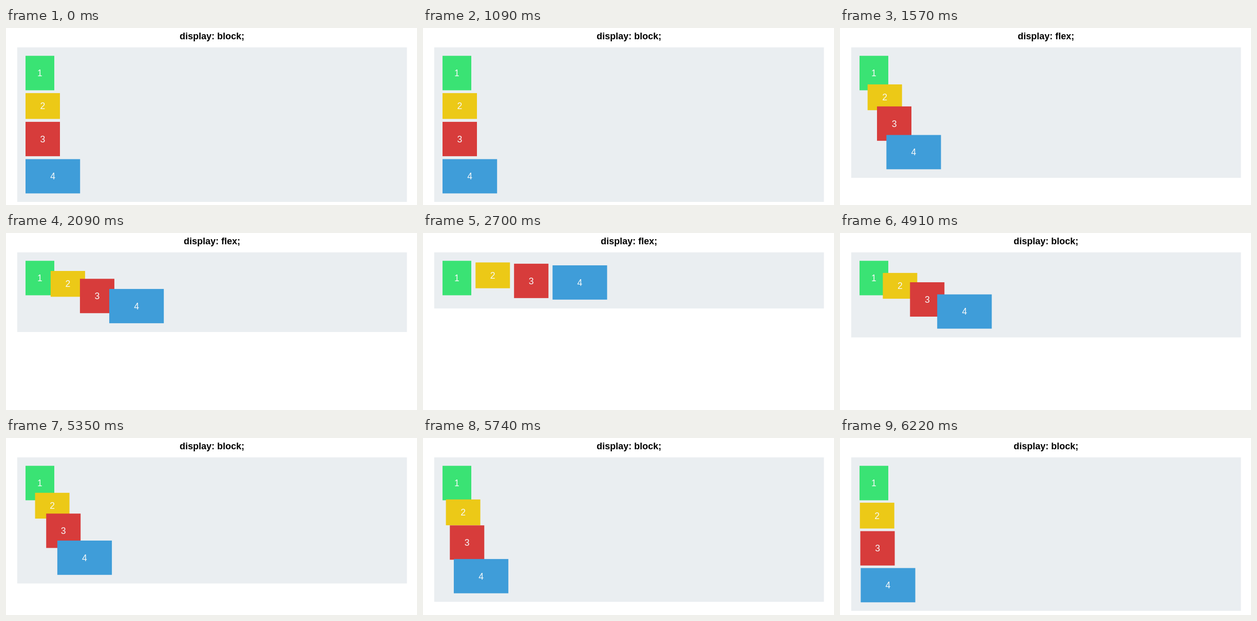
An HTML page with a canvas that plays this animation: 800x345 px, repeating every 6.27 s.

```html
<!DOCTYPE html>
<html lang="en">
<head>
<meta charset="utf-8">
<title>display: block and flex</title>
<style>
  html, body { margin: 0; width: 100%; height: 100%; overflow: hidden; background: #fff; }
  canvas { display: block; width: 800px; height: 345px; }
</style>
</head>
<body>
<canvas id="stage"></canvas>
<script>
const W = 800, H = 345;
const LOOP = 6270, FPS = 23, DURATION = 2000;
const TO_FLEX = 1220, TO_BLOCK = 4487;
const FONT = '"Liberation Sans", Arial, sans-serif';
const TOP = 54.2;

// x and y in the block layout, fx is x in the flex row
const boxes = [
  { color: '#3ae374', x: 38, y: TOP, fx: 38, w: 56, h: 67.2 },
  { color: '#ecc917', x: 38, y: 126.9, fx: 105.2, w: 67, h: 50.3 },
  { color: '#d73c3b', x: 38, y: 182.9, fx: 183.6, w: 67, h: 67 },
  { color: '#3f9dd9', x: 38, y: 255.6, fx: 262, w: 106.2, h: 66.8 }
];

const canvas = document.getElementById('stage');
const ctx = canvas.getContext('2d');
const ratio = window.devicePixelRatio || 1;
canvas.width = W * ratio;
canvas.height = H * ratio;
ctx.scale(ratio, ratio);
ctx.textAlign = 'center';

const lerp = (a, b, p) => a + (b - a) * p;

// cubic-bezier(.25, .1, .25, 1)
function ease(x) {
  if (x <= 0) return 0;
  if (x >= 1) return 1;
  let lo = 0, hi = 1;
  for (let i = 0; i < 30; i++) {
    const s = (lo + hi) / 2;
    if (0.75 * s * (1 - s) + s ** 3 < x) lo = s; else hi = s;
  }
  const s = lo, r = 1 - s;
  return 0.3 * s * r * r + 3 * s * s * r + s ** 3;
}

function draw(t) {
  const flex = t >= TO_FLEX && t < TO_BLOCK;
  const p = ease((t - TO_FLEX) / DURATION) - ease((t - TO_BLOCK) / DURATION);

  ctx.fillStyle = '#fff';
  ctx.fillRect(0, 0, W, H);

  ctx.fillStyle = '#000';
  ctx.font = 'bold 18px ' + FONT;
  ctx.fillText(flex ? 'display: flex;' : 'display: block;', 401, 21.5);

  ctx.fillStyle = '#eaeef1';
  ctx.fillRect(21.8, 37.7, 758.6, lerp(339, 138.3, p) - 37.7);

  ctx.font = '17.6px ' + FONT;
  boxes.forEach((b, i) => {
    const x = lerp(b.x, b.fx, p), y = lerp(b.y, TOP, p);
    ctx.fillStyle = b.color;
    ctx.fillRect(x, y, b.w, b.h);
    ctx.fillStyle = '#f7f9f9';
    ctx.fillText(i + 1, x + b.w / 2, y + b.h / 2 + 6.3);
  });
}

const start = performance.now();
function tick() {
  const t = Math.max(0, performance.now() - start) % LOOP;
  draw(Math.min(143, Math.floor((t + 5) * FPS / 1000)) * 1000 / FPS);
  requestAnimationFrame(tick);
}
tick();
</script>
</body>
</html>
```
